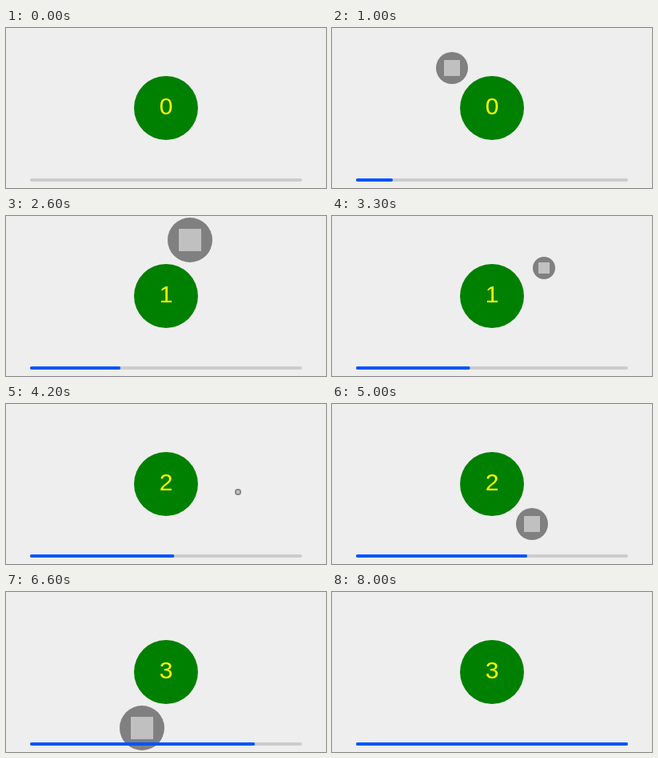
Recreate the animation shown at these times as an HTML page with a canvas. Size 400x200 px, loop 8.1 s.

```html
<!DOCTYPE html>
<html>
<head>
<meta charset="utf-8">
<style>
html, body { margin: 0; overflow: hidden; background: #eee; }
canvas { display: block; }
</style>
</head>
<body>
<canvas id="stage" width="400" height="200"></canvas>
<script>
const ctx = document.getElementById('stage').getContext('2d');
const STEP = 100, LOOP = 8100, TRAVEL = 8000, SIDES = 4;
const corners = [[100, 100], [200, 0], [300, 100], [200, 200], [100, 100]];

ctx.font = '30px Arial, "Liberation Sans", sans-serif';
ctx.textAlign = 'center';
ctx.textBaseline = 'middle';
ctx.lineWidth = 4;
ctx.lineCap = 'round';

function disc(x, y, r, color) {
  ctx.fillStyle = color;
  ctx.beginPath();
  ctx.arc(x, y, r, 0, Math.PI * 2);
  ctx.fill();
}

function bar(part, color) {
  if (part <= 0) return;
  ctx.strokeStyle = color;
  ctx.beginPath();
  ctx.moveTo(32, 190);
  ctx.lineTo(32 + 336 * part, 190);
  ctx.stroke();
}

function draw(time) {
  const progress = time / TRAVEL;
  const side = Math.min(Math.floor(progress * SIDES), SIDES - 1);
  const t = progress * SIDES - side;
  const [x0, y0] = corners[side], [x1, y1] = corners[side + 1];
  const x = x0 + (x1 - x0) * t, y = y0 + (y1 - y0) * t;
  // Grows on even sides, shrinks on odd ones
  const r = 40 * (side % 2 ? 1 - t : t);

  ctx.fillStyle = '#eee';
  ctx.fillRect(0, 0, 400, 200);

  disc(200, 100, 40, 'green');
  ctx.fillStyle = 'yellow';
  ctx.fillText(side, 200, 100);

  disc(x, y, r, 'gray');
  ctx.fillStyle = 'silver';
  ctx.fillRect(x - r / 2, y - r / 2, r, r);

  bar(1, '#ccc');
  bar(progress, '#05f');
}

function tick(now) {
  draw(Math.floor((now % LOOP) / STEP) * STEP);
  requestAnimationFrame(tick);
}
draw(0);
requestAnimationFrame(tick);
</script>
</body>
</html>
```
